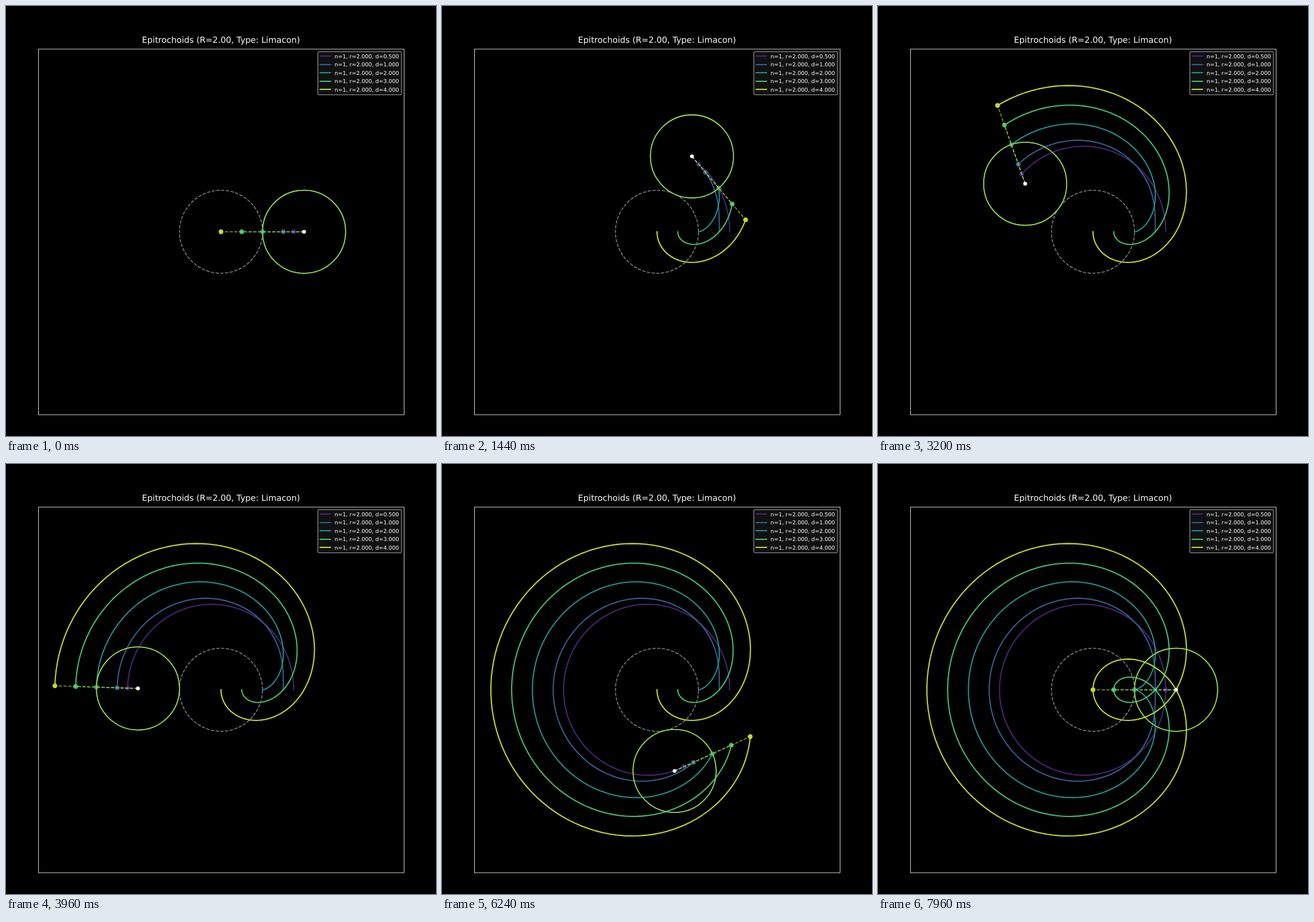
An HTML page for the animation above (8 s loop, 748x748 px).

```html
<!DOCTYPE html>
<html lang="en">
<head>
<meta charset="utf-8">
<title>Epitrochoids</title>
<style>
  html, body { margin: 0; width: 100%; height: 100%; overflow: hidden; background: #000; }
  svg { display: block; width: 100vw; height: 100vh; }
  text { fill: #fff; font-family: "DejaVu Sans", sans-serif; text-rendering: geometricPrecision; white-space: pre; }
  .title { font-size: 14.6px; text-anchor: middle; }
  .label { font-size: 9.47px; }
  .trace { fill: none; stroke-width: 2.08; stroke-linecap: square; stroke-linejoin: round; }
  .wheel { fill: none; stroke-width: 1.56; stroke-opacity: .8; }
  .arm { stroke-width: 1.56; stroke-opacity: .7; stroke-dasharray: 5.77 2.49; }
</style>
</head>
<body>
<svg id="stage" viewBox="0 0 748 748">
  <rect width="748" height="748" fill="#000"/>
  <circle r="72.25" transform="translate(374 392.7) scale(1 -1)" fill="none" stroke="#808080"
    stroke-width="1.56" stroke-dasharray="5.77 2.49"/>
  <g id="curves"></g>
  <circle id="hub" r="3.3" fill="#fff"/>
  <rect x="56.5" y="75" width="636" height="636" fill="none" stroke="#fff" stroke-width=".85"/>
  <text class="title" x="374" y="64.3">Epitrochoids (R=2.00, Type: Limacon)</text>
  <g id="legend">
    <rect x="542.5" y="79.5" width="145.5" height="75" rx="1.9" fill="#111" stroke="#a3a3a3" stroke-width="1.04"/>
  </g>
</svg>
<script>
const CX = 374, CY = 392.7, UNIT = 36.125, R = 2;
const STEPS = 200, STEP_MS = 40;
const arms = [
  [0.5, '#482475'], [1, '#355f8d'], [2, '#21918c'], [3, '#44bf70'], [4, '#bddf26']
];
const byId = id => document.getElementById(id);

function set(el, attrs) {
  for (const k in attrs) el.setAttribute(k, attrs[k]);
  return el;
}

function add(parent, tag, attrs) {
  const el = document.createElementNS('http://www.w3.org/2000/svg', tag);
  return parent.appendChild(set(el, attrs));
}

// Tip of an arm of length d on the rolling wheel; d = 0 is the wheel's centre.
function tip(i, d) {
  const a = 2 * Math.PI * i / (STEPS - 1);
  return [
    CX + UNIT * (2 * R * Math.cos(a) - d * Math.cos(2 * a)),
    CY - UNIT * (2 * R * Math.sin(a) - d * Math.sin(2 * a))
  ];
}

const curves = arms.map(([d, color], row) => {
  const g = byId('curves'), legend = byId('legend');
  const y = Math.round(87.3 + 14.45 * row);
  add(legend, 'path', { d: `M545.5 ${y}h20`, stroke: color, 'stroke-width': 2.08 });
  add(legend, 'text', { class: 'label', x: 571.6, y: 90.7 + 14.45 * row })
    .textContent = `n=1, r=2.000, d=${d.toFixed(3)}`;

  return {
    d,
    points: Array.from({ length: STEPS }, (_, i) => tip(i, d).map(v => v.toFixed(2)).join()),
    trace: add(g, 'polyline', { class: 'trace', stroke: color }),
    dot: add(g, 'circle', { r: 4.16, fill: color }),
    wheel: add(g, 'circle', { class: 'wheel', r: R * UNIT, stroke: color }),
    arm: add(g, 'line', { class: 'arm', stroke: color })
  };
});

function draw(now) {
  const i = Math.floor(now / STEP_MS) % STEPS;
  const [hx, hy] = tip(i, 0);
  set(byId('hub'), { cx: hx, cy: hy });
  for (const c of curves) {
    const [x, y] = tip(i, c.d);
    set(c.trace, { points: i ? c.points.slice(0, i + 1).join(' ') : '' });
    set(c.dot, { cx: x, cy: y });
    set(c.wheel, { cx: hx, cy: hy });
    set(c.arm, { x1: hx, y1: hy, x2: x, y2: y });
  }
}

function loop() {
  draw(performance.now());
  requestAnimationFrame(loop);
}
loop();
</script>
</body>
</html>
```
